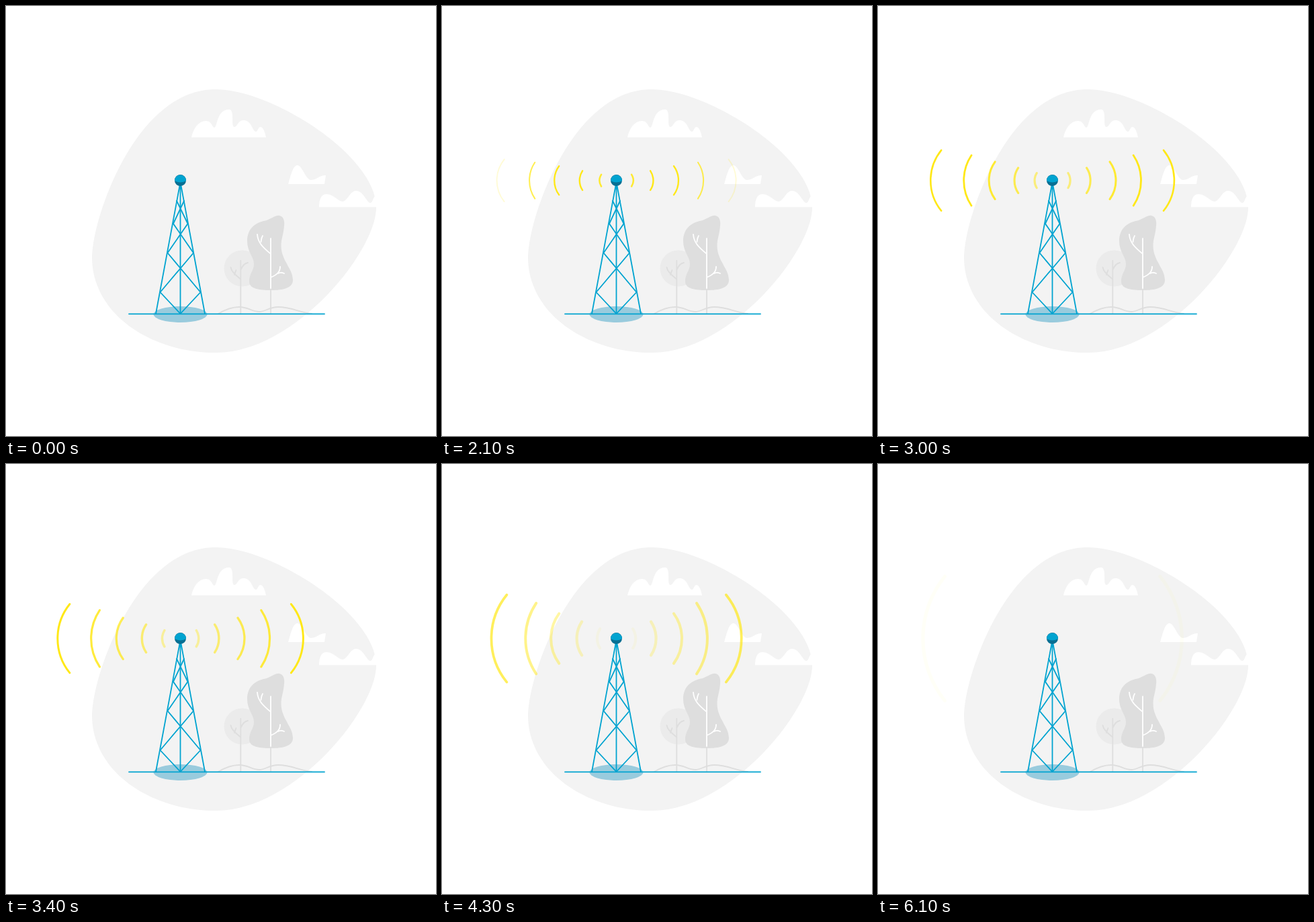
An HTML page that plays this animation: 640x640 px, repeating every 6800 ms.

```html
<!DOCTYPE html>
<html lang="en">
<head>
<meta charset="utf-8">
<title>Radio tower</title>
<style>
  html, body { margin: 0; width: 100%; height: 100%; overflow: hidden; background: #fff; }
  svg { display: block; width: 100%; height: 100%; }
  .line { fill: none; stroke-width: 1.8; stroke-linecap: round; stroke-linejoin: round; }
  .blue { stroke: #00a3d0; }
  .grey { stroke: #dedede; }
  .white { stroke: #fff; }
  .wave { fill: none; stroke: #ffe817; stroke-linecap: round; }
</style>
</head>
<body>
<svg viewBox="0 0 640 640" xmlns="http://www.w3.org/2000/svg">
  <path fill="#f3f3f3" d="M312 124C395 124 551 222 551 300C551 365 430 516 312 516C215 516 128 458 128 374C128 318 192 124 312 124Z"/>

  <g id="clouds" fill="#fff">
    <path d="M276 195.5C279 183 286 171 298 171C306 171 307 181 310 181C315 181 313 154 332 154C341 154 334 180 340 180C344 180 346 169 354 170C366 171 367 187 372 187C375 187 375 180 379 180C383 180 386 190 387 195.5Z"/>
    <path d="M420 265C423 255 427 237 433.5 237C441 237 446 259 454 259C462 259 466 252 476 252L474 265Z"/>
    <path d="M466 299.3C466 288 469 280 477 280C488 280 494 291 501 291C508 291 512 275 521 275C532 275 537 293 542 293C546 293 546 285 550 282L553 282V299.3Z"/>
  </g>

  <g id="trees">
    <circle cx="351.5" cy="390.5" r="27" fill="#ebebeb"/>
    <path class="line grey" d="M316 458C326 452 335 448 347 448C361 448 365 455 377 455C386 455 392 448 405 448C425 448 436 456 455 458"/>
    <path class="line grey" d="M349.3 379V458M349.3 407C345 402 336 398 334.5 389M340 400L342.5 393M349.3 393C352 386 355 383 360 382"/>
    <path fill="#dedede" d="M388 319C396 316 402 311 407 312C413 313 415 320 414 327C413 343 408 348 410 363C413 382 427 392 427 408C427 420 412 423 395 423C377 423 362 421 362 410C362 398 369 394 369 384C369 373 359 366 359 350C359 332 370 322 388 319Z"/>
    <path class="line grey" d="M394 423V458"/>
    <path class="line white" d="M394 346V420M394 369C385 361 375 354 374 340M379.5 351C380 348 380 345 382 342M394 404C403 400 408 396 408 388M405 398C409 396 412 397 414 398"/>
  </g>

  <g id="tower">
    <ellipse cx="259.5" cy="459" rx="40" ry="12" fill="#99cbdd"/>
    <path class="line blue" d="M183 458.3H474"/>
    <path class="line blue" d="M223 458L259.5 262L296 458M259.5 262V458"/>
    <path class="line blue" d="M259.5 458L229.5 426L279 367.5L249 324L265 290M259.5 458L289.5 426L240.5 367.5L270.5 324L254 290"/>
    <circle cx="259.5" cy="259.5" r="8.5" fill="#086f93"/>
    <path fill="#00a3d0" d="M251 260A8.5 8.5 0 0 1 268 260Q259.5 265 251 260Z"/>
  </g>

  <g id="waves"></g>
</svg>
<script>
const LOOP = 6800, STEP = 100, LAST = 6100;
const CX = 259.6, CY = 259.7;
const FADE_IN = 1100, FADE_OUT = 2680;

// x: anchor, apex/tip: offsets from it, half: half height (all at scale 1)
// size/rate: scale at 1.4 s and growth per second
const waves = [
  { x: 279,   apex: 9,    tip: 5,    half: 14, size: 0.50,  rate: 0.181, start: 200,  end: 4470 },
  { x: 308.8, apex: 9.4,  tip: 2.2,  half: 24, size: 0.46,  rate: 0.200, start: 600,  end: 5000 },
  { x: 345,   apex: 12,   tip: 0,    half: 37, size: 0.445, rate: 0.192, start: 1000, end: 5350 },
  { x: 383,   apex: 12,   tip: -4,   half: 53, size: 0.355, rate: 0.220, start: 1270, end: 5650 },
  { x: 430,   apex: 16.7, tip: -7.6, half: 69, size: 0.30,  rate: 0.221, start: 1900, end: 6180 }
];

const clamp = v => Math.max(0, Math.min(1, v));
const layer = document.getElementById("waves");

function addPath() {
  const p = document.createElementNS("http://www.w3.org/2000/svg", "path");
  p.setAttribute("class", "wave");
  return layer.appendChild(p);
}

for (const w of waves) w.sides = [1, -1].map(dir => ({ dir, path: addPath() }));

function arc(dir, tip, apex, half) {
  const sag = apex - tip;
  const r = (half * half + sag * sag) / (2 * sag);
  const x = CX + dir * (tip - CX);
  return `M${x} ${CY - half}A${r} ${r} 0 0 ${dir > 0 ? 1 : 0} ${x} ${CY + half}`;
}

function render(time) {
  const t = Math.min(LAST, Math.floor((time % LOOP) / STEP) * STEP);
  for (const w of waves) {
    const s = w.size + w.rate * (t - 1400) / 1000;
    const alpha = Math.min(clamp((t - w.start) / FADE_IN), clamp((w.end - t) / FADE_OUT));
    for (const { dir, path } of w.sides) {
      path.style.display = alpha > 0 ? "" : "none";
      if (!alpha) continue;
      path.setAttribute("d", arc(dir, w.x + w.tip * s, w.x + w.apex * s, w.half * s));
      path.setAttribute("stroke-width", 4 * s);
      path.setAttribute("opacity", alpha);
    }
  }
}

const began = performance.now();
function tick() {
  render(performance.now() - began);
  requestAnimationFrame(tick);
}
tick();
</script>
</body>
</html>
```
